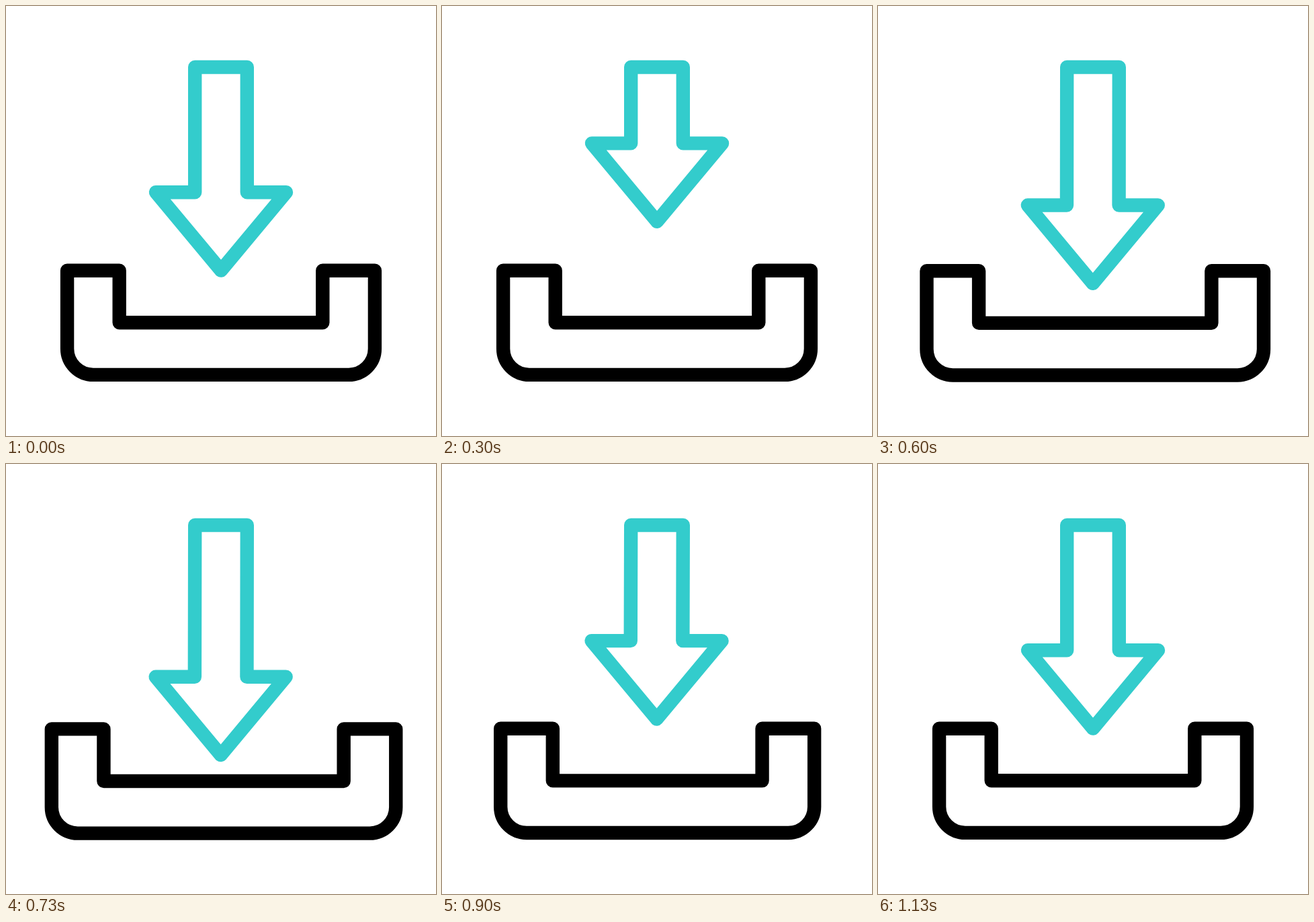
An HTML page with a canvas for the animation above (1.5 s loop, 640 px wide and 640 px high).

```html
<!DOCTYPE html>
<html lang="en">
<head>
<meta charset="utf-8">
<title>Download</title>
<style>
  html, body { margin: 0; width: 100%; height: 100%; overflow: hidden; background: #fff; }
  canvas { display: block; width: 640px; height: 640px; }
</style>
</head>
<body>
<canvas id="stage" width="640" height="640"></canvas>
<script>
const ctx = document.getElementById('stage').getContext('2d');
const LOOP = 1500, LAST_STEP = 34;
const CENTER = 320, UNIT = 19.4;

// Keys are [step, value] at 30 steps per second, linear in between.
const HEAD_DROP = [[0, 0], [12.3, -99.5], [20, 61], [29, -35.5], [34, 0]];
const HEAD_DRIFT = [[12.3, 0], [20, -0.3], [29, -0.5], [34, 0]];
const TRAY_SPREAD = [[15, 0], [20, 1], [28, 0]];

function valueAt(keys, step) {
  if (step <= keys[0][0]) return keys[0][1];
  for (let i = 1; i < keys.length; i++) {
    const [s0, v0] = keys[i - 1], [s1, v1] = keys[i];
    if (step <= s1) return v0 + (v1 - v0) * (step - s0) / (s1 - s0);
  }
  return keys[keys.length - 1][1];
}

// Step times are rounded to 10 ms.
function stepAt(ms) {
  const t = Math.floor(ms / 10) * 10;
  return Math.min(LAST_STEP, Math.floor((t + 3.4) * 0.03));
}

function outline(color, trace) {
  ctx.strokeStyle = color;
  ctx.beginPath();
  trace();
  ctx.closePath();
  ctx.stroke();
}

function drawTray(spread) {
  const left = CENTER - 11.8 * UNIT - 31 * spread;
  const right = CENTER + 11.8 * UNIT + 41.8 * spread;
  const top = 393.7 + 0.9 * spread;
  const floor = top + 4 * UNIT, bottom = top + 8 * UNIT;
  const radius = 2 * UNIT, arm = 4 * UNIT;
  outline('#000', () => {
    ctx.moveTo(left, top);
    ctx.lineTo(left + arm, top);
    ctx.lineTo(left + arm, floor);
    ctx.lineTo(right - arm, floor);
    ctx.lineTo(right - arm, top);
    ctx.lineTo(right, top);
    ctx.arcTo(right, bottom, left, bottom, radius);
    ctx.arcTo(left, bottom, left, top, radius);
  });
}

function drawArrow(drop, drift) {
  const x = CENTER + drift, y = 277.2 + drop, top = 91;
  const stem = 2 * UNIT, wing = 5 * UNIT;
  outline('#33cccc', () => {
    ctx.moveTo(CENTER - stem, top);
    ctx.lineTo(CENTER + stem, top);
    ctx.lineTo(x + stem, y);
    ctx.lineTo(x + wing, y);
    ctx.lineTo(x, y + 6 * UNIT);
    ctx.lineTo(x - wing, y);
    ctx.lineTo(x - stem, y);
  });
}

function render(now) {
  const step = stepAt(now % LOOP);
  ctx.fillStyle = '#fff';
  ctx.fillRect(0, 0, 640, 640);
  ctx.lineWidth = 20.4;
  ctx.lineJoin = 'round';
  drawTray(valueAt(TRAY_SPREAD, step));
  drawArrow(valueAt(HEAD_DROP, step), valueAt(HEAD_DRIFT, step));
}

let start;
function tick(now) {
  start ??= now;
  render(Math.max(0, now - start));
  requestAnimationFrame(tick);
}
render(0);
requestAnimationFrame(tick);
</script>
</body>
</html>
```
